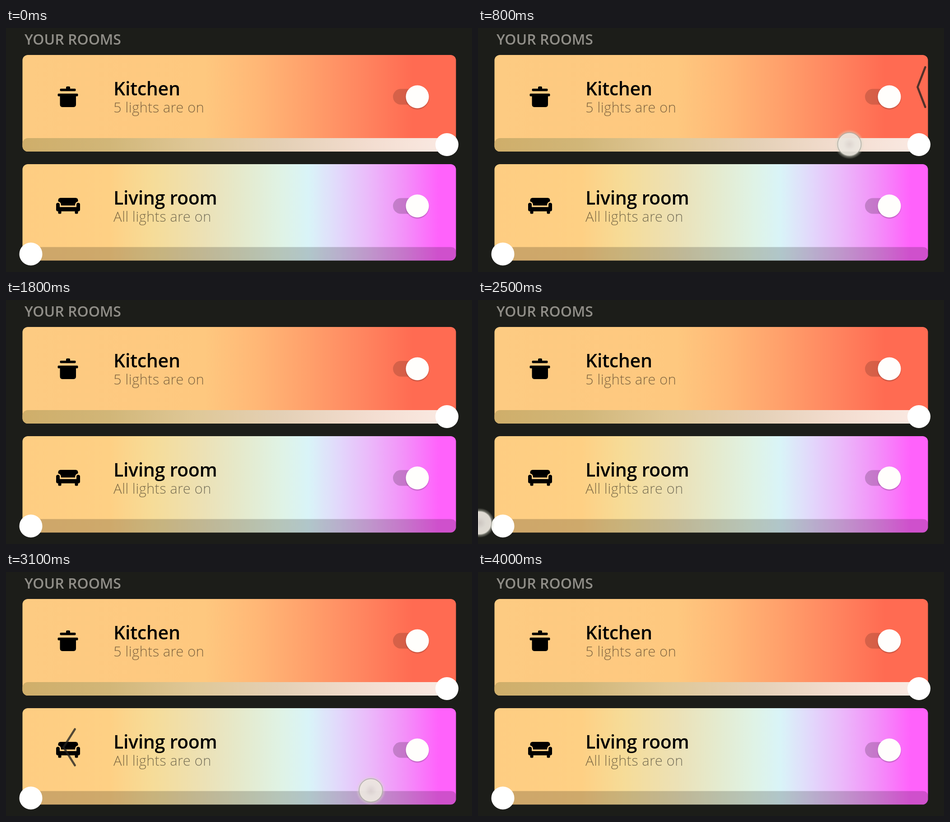
Recreate the animation shown at these times as an HTML page. Size 1032 by 543 pixels, loop 4500 ms.

```html
<!DOCTYPE html>
<html lang="en">
<head>
<meta charset="utf-8">
<title>Rooms</title>
<style>
  html, body { margin: 0; width: 100%; height: 100%; overflow: hidden; background: #1c1d19; }
  svg { display: block; width: 1032px; height: 543px; font-family: "Open Sans", "Noto Sans", sans-serif; }
  .head { font-size: 32px; font-weight: 600; fill: #908e88; }
  .name { font-size: 41px; font-weight: 600; letter-spacing: -.3px; }
  .note { font-size: 31px; font-weight: 300; letter-spacing: .3px; fill-opacity: .5; }
  .knob { fill: #fffefc; filter: url(#shadow); }
</style>
</head>
<body>
<svg viewBox="0 0 1032 543" xmlns="http://www.w3.org/2000/svg">
  <defs>
    <linearGradient id="warm">
      <stop offset="0" stop-color="#fdcb82"/>
      <stop offset=".42" stop-color="#fec87f"/>
      <stop offset=".54" stop-color="#ffb776"/>
      <stop offset=".66" stop-color="#ffa06b"/>
      <stop offset=".78" stop-color="#ff8660"/>
      <stop offset=".9" stop-color="#ff6b52"/>
    </linearGradient>
    <linearGradient id="level">
      <stop offset="0" stop-color="#cfae6a"/>
      <stop offset=".2" stop-color="#d1b678"/>
      <stop offset=".4" stop-color="#dfc898"/>
      <stop offset=".6" stop-color="#e4d0b6"/>
      <stop offset=".8" stop-color="#f3ddd0"/>
      <stop offset="1" stop-color="#fbebe5"/>
    </linearGradient>
    <linearGradient id="rainbow">
      <stop offset="0" stop-color="#fecd82"/>
      <stop offset=".2" stop-color="#fed084"/>
      <stop offset=".3" stop-color="#f6dc98"/>
      <stop offset=".42" stop-color="#ece1b6"/>
      <stop offset=".52" stop-color="#e4ebd0"/>
      <stop offset=".6" stop-color="#dff3e6"/>
      <stop offset=".66" stop-color="#d9f4f8"/>
      <stop offset=".73" stop-color="#e2d8fb"/>
      <stop offset=".8" stop-color="#ebb9fa"/>
      <stop offset=".88" stop-color="#f391f9"/>
      <stop offset=".96" stop-color="#ff62fb"/>
    </linearGradient>
    <radialGradient id="glow">
      <stop offset=".76" stop-color="#d8d8c8" stop-opacity=".6"/>
      <stop offset="1" stop-color="#d8d8c8" stop-opacity="0"/>
    </radialGradient>
    <radialGradient id="pad">
      <stop offset="0" stop-color="#dcd4d0" stop-opacity=".8"/>
      <stop offset=".5" stop-color="#ebe6e0" stop-opacity=".84"/>
      <stop offset="1" stop-color="#f0eae2" stop-opacity=".84"/>
    </radialGradient>
    <filter id="shadow" x="-20%" y="-20%" width="140%" height="150%">
      <feDropShadow dx="0" dy="2" stdDeviation="1.2" flood-opacity=".3"/>
    </filter>
  </defs>

  <rect width="1032" height="543" fill="#1c1d19"/>
  <text class="head" x="41" y="37">YOUR ROOMS</text>

  <rect x="36.5" y="60" width="960" height="215" rx="12" fill="url(#warm)"/>
  <rect x="36.5" y="245" width="960" height="30" rx="12" fill="url(#level)"/>
  <g>
    <rect x="133" y="130" width="9" height="8" rx="2.5"/>
    <rect x="119.500" y="135" width="35" height="5.500" rx="2"/>
    <rect x="114.500" y="146" width="45" height="6" rx="2"/>
    <path d="M119.500 150H155v20q0 6-6 6H125.500q-6 0-6-6z"/>
  </g>
  <text class="name" x="238" y="150">Kitchen</text>
  <text class="note" x="238" y="188">5 lights are on</text>
  <rect x="857" y="135.500" width="70" height="35" rx="17.500" fill-opacity=".16"/>
  <circle class="knob" cx="911" cy="153" r="25.500"/>
  <circle cx="976.500" cy="259.500" r="25.500" fill="#fff"/>

  <rect x="36.500" y="303" width="960" height="214.500" rx="12" fill="url(#rainbow)"/>
  <path d="M36.500 499q0-11.500 12-11.500H984.500q12 0 12 11.500v6.500q0 12-12 12H48.500q-12 0-12-12z" fill-opacity=".19"/>
  <g>
    <path d="M121 378H154q5.500 0 5.500 6v2q-6 1-6.500 8v1H122v-1q-.5-7-6.500-8v-2q0-6 5.500-6z"/>
    <path d="M111 393q0-4 4-4t4 4v5.500H156V393q0-4 4-4t4 4v11q0 4-4 4h-.5v3.500q0 2-2 2h-3q-2 0-2-2V408H122.500v3.500q0 2-2 2h-3q-2 0-2-2V408H115q-4 0-4-4z"/>
  </g>
  <text class="name" x="238" y="393">Living room</text>
  <text class="note" x="238" y="431">All lights are on</text>
  <rect x="857" y="378.500" width="70" height="35" rx="17.500" fill-opacity=".19"/>
  <circle class="knob" cx="911" cy="396" r="25.500"/>
  <circle cx="55" cy="503" r="25.500" fill="#fff"/>

  <rect id="dim" width="1032" height="290" fill="#1c1d19" opacity="0"/>
  <path id="arrow" fill="none" stroke="#22221f" stroke-opacity=".78" stroke-width="4.600" stroke-linecap="round" stroke-linejoin="round"/>
  <g id="touch">
    <circle r="33" fill="url(#glow)"/>
    <circle r="26" fill="url(#pad)" stroke="#9b9d94" stroke-opacity=".6" stroke-width="2"/>
  </g>
</svg>
<script>
const LOOP = 4500, STEP = 100, ARM = 47.500;
const [dim, arrow, touch] = ["dim", "arrow", "touch"].map(id => document.getElementById(id));

// Each key is [time, value]; times within a swipe count from its start.
const swipes = [
  {
    start: 600, end: 1800, edge: 1032, side: -1, mid: 131.500,
    x: [[0, 1032], [100, 965], [300, 680], [500, 413], [700, 290], [800, 267]],
    y: [[0, 240], [500, 287], [800, 296]],
    show: [[700, 1], [1000, 0]],
    out: [[0, -20], [200, 50], [500, 128], [700, 136], [900, 100], [1200, -20]],
    bend: [[0, 5], [200, 21], [500, 36], [800, 36], [1200, 10]]
  },
  {
    start: 2500, end: 4000, edge: 0, side: 1, mid: 390,
    x: [[0, 4], [100, 65], [200, 170], [400, 515], [600, 808], [800, 930], [900, 955]],
    y: [[0, 496], [200, 493], [600, 486], [900, 482]],
    show: [[900, 1], [1200, 0]],
    out: [[0, -20], [200, 49], [400, 115], [600, 140], [900, 142], [1100, 105], [1500, -20]],
    bend: [[0, 5], [200, 21], [600, 32], [900, 35], [1500, 10]]
  }
];
const dimKeys = [[2500, 0], [2700, .13], [2800, .13], [3000, 0]];

function at(keys, t) {
  if (t <= keys[0][0]) return keys[0][1];
  const i = keys.findIndex(k => k[0] > t);
  if (i < 0) return keys[keys.length - 1][1];
  const [t0, a] = keys[i - 1], [t1, b] = keys[i];
  return a + (b - a) * (t - t0) / (t1 - t0);
}

function draw(t) {
  const s = swipes.find(s => t >= s.start && t < s.end);
  dim.setAttribute("opacity", at(dimKeys, t));
  arrow.style.display = touch.style.display = s ? "" : "none";
  if (!s) return;

  const u = t - s.start;
  touch.setAttribute("transform", `translate(${at(s.x, u)} ${at(s.y, u)})`);
  touch.setAttribute("opacity", at(s.show, u));

  const angle = at(s.bend, u) * Math.PI / 180;
  const w = ARM * Math.sin(angle), h = ARM * Math.cos(angle);
  const x = s.edge + s.side * at(s.out, u);
  arrow.setAttribute("d", `M${x + w / 2} ${s.mid - h}L${x - w / 2} ${s.mid}L${x + w / 2} ${s.mid + h}`);
}

// The screen advances ten times a second.
const begin = performance.now();
function tick() {
  const t = (performance.now() - begin) % LOOP;
  draw(Math.floor(t / STEP) * STEP);
  requestAnimationFrame(tick);
}
tick();
</script>
</body>
</html>
```
